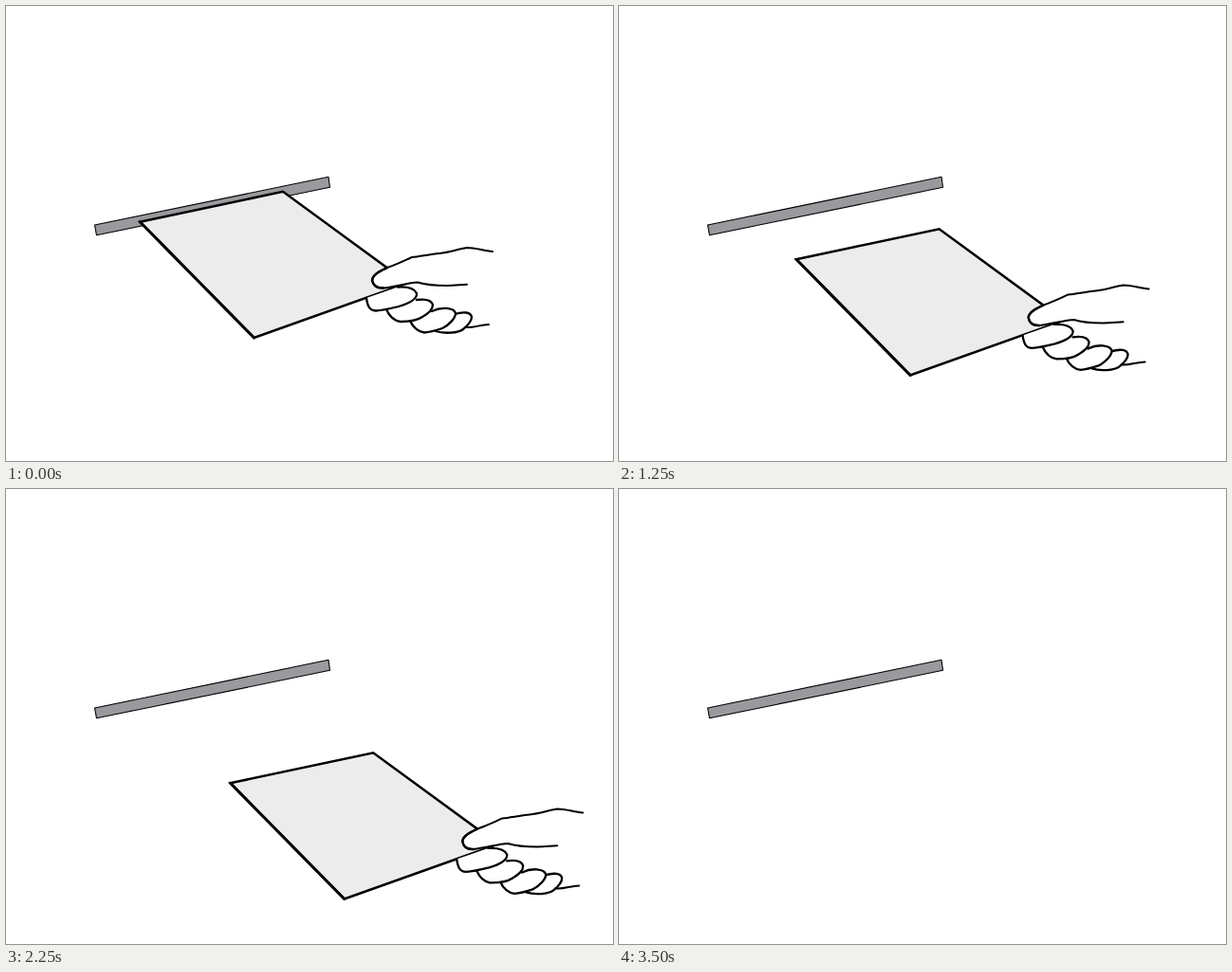
Recreate the animation shown at these times as an HTML page. Size 640 by 480 pixels, loop 4 s.

```html
<!DOCTYPE html>
<html lang="en">
<head>
<meta charset="utf-8">
<title>Pulling a sheet from a slot</title>
<style>
  html, body { margin: 0; width: 100%; height: 100%; overflow: hidden; background: #fff; }
  svg { display: block; width: 640px; height: 480px; }
</style>
</head>
<body>
<svg viewBox="0 0 640 480" stroke="#000" stroke-linejoin="round" stroke-linecap="round">
  <path d="M93.5 231L340 180.3L341.5 191.3L95.5 241.8Z" fill="#9a999e" stroke-width="1.1"/>
  <g id="pull" fill="#fff">
    <path d="M141.3 227.8L292 195.8L423.7 292.2L261.5 350Z" fill="#ececec" stroke-width="2.5" stroke-linejoin="miter"/>
    <path d="M141.3 227.8L261.5 350" stroke-width="3"/>
    <!-- fingers, from the far one to the near one -->
    <g stroke-width="2.3">
      <path d="M453 343C462 346 477 345 482 341C488 336 491 332 491 328C490 323 483 322 473 325"/>
      <path d="M426 332C429 339 435 344 441 344.5C448 344 454 342 460 340C468 336 474 329 474 324C472 318 459 317 449 322"/>
      <path d="M401 320C404 327 409 332 416 333C424 333 433 332 439 328C445 324 450 321 450 315C448 309 440 309 433 310"/>
      <path d="M380 308C381 316 383 321 390 321.5C398 321 406 319 414 317C424 314 434 310 433 303C430 297 422 296 413 296.5"/>
    </g>
    <path d="M484 339C493 340 500 336 509 336" fill="none" stroke-width="2"/>
    <!-- thumb and back of the hand -->
    <path d="M513 259C503 258 495 255 486 255C475 257 467 260 457 261C447 262 437 264 428 265C419 269 411 273 402 276C394 280 387 283 386 289C387 295 391 298 398 297.5C411 296 424 292 434 291.5C442 294 455 295 465 295C473 295 479 294 486 293.7" stroke-width="2"/>
    <path d="M402 276C394 280 387 283 386 289C387 295 391 298 398 297.5" fill="none" stroke-width="2.4"/>
  </g>
</svg>
<script>
  const LOOP = 4000, STEP = 250, PULL_START = 500, PULL_END = 3000, HIDE = 3500;
  const FIRST = [8.4, 7.2], STRIDE = [12.4, 10.75], LAST = [124, 107.3];
  const pull = document.getElementById("pull");

  function offset(time, axis) {
    if (time < PULL_START) return 0;
    if (time >= PULL_END) return LAST[axis];
    return FIRST[axis] + STRIDE[axis] * Math.floor((time - PULL_START) / STEP);
  }

  function draw() {
    const time = performance.now() % LOOP;
    pull.setAttribute("transform", `translate(${offset(time, 0)} ${offset(time, 1)})`);
    pull.setAttribute("visibility", time < HIDE ? "visible" : "hidden");
    requestAnimationFrame(draw);
  }
  draw();
</script>
</body>
</html>
```
